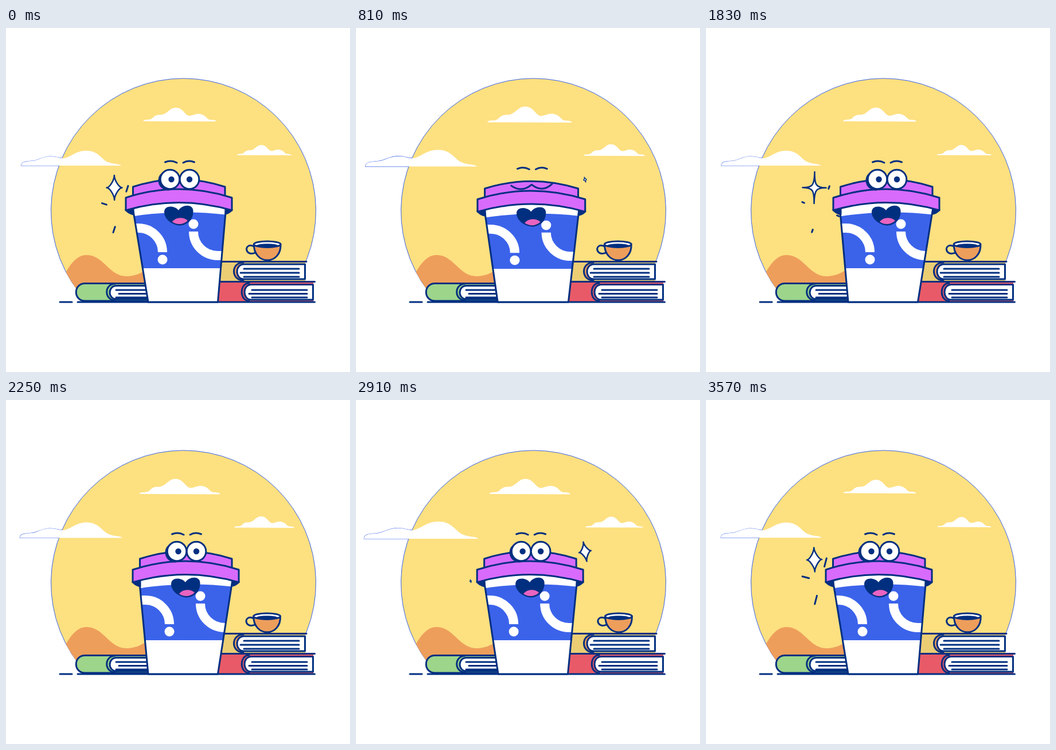
These frames come from a looping animation (600x600 px, 3600 ms). An HTML page:

```html
<!DOCTYPE html>
<html lang="en">
<head>
<meta charset="utf-8">
<title>Coffee and books</title>
<style>
html, body { margin: 0; width: 100%; height: 100%; overflow: hidden; background: #fff; }
svg { display: block; width: 100vw; height: 100vh; }
.ink { stroke: #012f80; stroke-width: 3; stroke-linecap: round; stroke-linejoin: round; }
.line { fill: none; }
.flat { stroke: none; }
.thin { stroke: #3b63ea; stroke-width: 1; }
.navy { fill: #012f80; }
.white { fill: #fff; }
.blue { fill: #3b63ea; }
.purple { fill: #d86bfc; }
.orange { fill: #ee9e5b; }
</style>
</head>
<body>
<svg viewBox="0 0 600 600">
  <defs>
    <clipPath id="sun"><path d="M142 478A231 231 0 1 1 477 478Z"/></clipPath>
    <clipPath id="bodyClip"><path class="bodyShape"/></clipPath>
    <path id="cloud" d="M-63 10.5C-58 7 -53 11 -47 6C-41 -1 -36 1 -30 0C-21 -2 -17 -12 -7 -12C7 -12 9 3 18 2C25 1 28 -2 35 -1C47 1 46 9 54 9C59 9 63 10 63 12L-63 11.5Z"/>
    <path id="longCloud" d="M-87 13C-87 6 -79 6 -69 5C-59 5 -51 -3 -36 -3C-24 -3 -19 1 -12 0C1 -3 8 -13 26 -13C48 -13 53 4 64 7C73 11 81 9 87 13Z"/>
  </defs>

  <use class="left thin white" href="#longCloud"/>
  <path class="thin" fill="#fde080" d="M142 478A231 231 0 1 1 477 478Z"/>
  <path class="orange" clip-path="url(#sun)" d="M95 445C115 400 130 396 141 396C170 396 180 433 210 433C232 433 245 421 260 412V478H95Z"/>
  <use class="left white" href="#longCloud"/>
  <use id="topCloud" class="white" href="#cloud"/>
  <use id="rightCloud" class="white" href="#cloud"/>

  <g class="ink">
    <path fill="#9dd58b" d="M255 445.5H138C117 445.5 117 476 138 476H255"/>
    <path class="line" d="M190 446C171 447 171 474 190 475"/>
    <path class="white" d="M255 449.500H193C177 449.500 177 473 193 473H255M192 457H250M197 463.500H250M192 470H250"/>

    <path class="flat" fill="#e95a68" d="M360 443H536V478H360Z"/>
    <path class="line" d="M424 445C407 445 407 476 424 476"/>
    <path class="white" d="M535.500 447.500H428C412 447.500 412 474 428 474H535.500Z"/>
    <path class="line" d="M429 457H525M424 463.500H525M429 470H525"/>

    <path class="flat" fill="#ebcd74" d="M365 408H522V441H365Z"/>
    <path class="orange" d="M414 409C392 409 392 440 414 440"/>
    <path class="white" d="M521.500 412H415C399 412 399 438 415 438H521.500Z"/>
    <path class="line" d="M415 420H511M409 427H511M415 434H511"/>

    <path class="line" d="M366 407.500H524M366 442.500H538.500M94 478H115M125 478H538.500"/>

    <g id="mug">
      <path class="line" d="M433 381C423 376 417 383 421 390C425 395 432 394 436 391"/>
      <path class="orange" d="M432.500 377C432 394 443 405 456 405C469 405 480 394 479 377Z"/>
      <ellipse class="white" cx="455.700" cy="377.200" rx="23.300" ry="5.200"/>
      <ellipse class="navy flat" cx="455.700" cy="379.800" rx="19" ry="3.500"/>
    </g>
  </g>

  <g id="sparkles" class="ink"></g>

  <g id="cup">
    <path class="bodyShape white"/>
    <g clip-path="url(#bodyClip)"><g class="lean">
      <path class="blue" d="M190 334Q301 311 415 330V419H190Z"/>
      <path fill="none" stroke="#fff" stroke-width="16" d="M205 349H231A42 42 0 0 1 273 391M327 355A42 42 0 0 0 369 397H405"/>
      <circle class="white" cx="273" cy="404" r="8.500"/>
      <circle class="white" cx="327" cy="342" r="8.500"/>
    </g></g>
    <path class="bodyShape ink line"/>
    <g class="lean ink">
      <path class="navy" d="M209 317Q213 323 222 325V310ZM394 317Q391 322 383 324V310Z"/>
      <path class="purple" d="M221.500 294V277Q301 251 382 277V294Z"/>
      <path class="purple" d="M209 296Q301 266 394 296V318Q301 291 209 318Z"/>
      <path class="navy flat" d="M276 321C276 309 294 309 301 318C307 308 326 306 326.500 319C327 336 314 344 303 344.500C289 343.500 276 333 276 321Z"/>
      <path class="flat" fill="#e864c0" d="M290 338C297 329 311 330 317 336C309 343.500 298 344 290 338Z"/>
      <g id="eyes">
        <circle class="navy" cx="283" cy="266" r="16"/>
        <circle class="white" cx="286" cy="264" r="16.800"/>
        <circle class="white" cx="320" cy="264" r="16.800"/>
        <circle class="navy flat" cx="288.500" cy="264" r="5.200"/>
        <circle class="navy flat" cx="320" cy="264" r="5.200"/>
      </g>
      <path id="lids" class="line" d="M267 272Q285 285 302 270Q320 285 337 269"/>
      <path id="brows" class="line" d="M277.500 234Q288 229.500 298 235M309 235Q318 229.500 328.500 234"/>
    </g>
  </g>
</svg>
<script>
const LOOP = 3600, CYCLE = 1800;
const all = s => document.querySelectorAll(s);
const el = id => document.getElementById(id);
const set = (nodes, name, value) => nodes.forEach(n => n.setAttribute(name, value));
const clamp = x => Math.min(1, Math.max(0, x));
const mix = (a, b, k) => a + (b - a) * clamp(k);
const ease = x => (x = clamp(x)) < .5 ? 4 * x ** 3 : 1 - 4 * (1 - x) ** 3;
const wave = (t, peak) => Math.cos(2 * Math.PI * (t - peak) / CYCLE);
const place = (x, y, sx, sy = sx) => `translate(${x} ${y}) scale(${sx} ${sy})`;

// x, y and birth time of each sparkle
const stars = [[189, 278.5, 1285], [200, 316, 1080], [399.5, 264.5, 760]];

function star(age) {
  if (age > 640) return '';
  const grow = mix(0, 1, age / 200), swell = clamp((age - 350) / 130);
  const pop = clamp((age - 515) / 15), fade = 1 - clamp((age - 555) / 85);
  const w = mix(mix(10.5, 13, swell), 20.5, pop) * grow * fade;
  const h = mix(mix(17, 21, swell), 27.5, pop) * grow * fade;
  const bulge = mix(.65, .15, pop);
  const turn = mix(-16, 1, (age - 250) / 290);
  const p = w * bulge, q = h * bulge;
  return `<path class="white" stroke-width="${mix(1, 2.5, age / 150)}" transform="rotate(${turn})"
    d="M0 ${-h}C0 ${-q} ${p} 0 ${w} 0C${p} 0 0 ${q} 0 ${h}C0 ${q} ${-p} 0 ${-w} 0C${-p} 0 0 ${-q} 0 ${-h}Z"/>`;
}

function burst(age) {
  const u = (age - 560) / 200;
  if (u < .2 || u > 1) return '';
  const outer = 43 * (1 - (1 - u) ** 3), inner = Math.min(outer, 40 * u);
  const a = inner * .8, b = outer * .8;
  return `<path class="line" transform="rotate(${22 * u})"
    d="M0 ${-inner}V${-outer}M0 ${inner}V${outer}M${-a} 0H${-b}M${a} 0H${b}"/>`;
}

function draw(t) {
  const dx = 13 * (ease((t - 40) / 1760) - ease((t - 1800) / 1700));
  const blink = ease((210 - Math.abs(t % CYCLE - 810)) / 150);
  const squash = .015 * blink;

  set(all('.left'), 'transform', place(114, 227, (186.5 + 13.5 * wave(t, 1065)) / 174));
  set([el('topCloud')], 'transform', place(303, 151, (136.5 + 10.5 * wave(t, 780)) / 126));
  set([el('rightCloud')], 'transform', place(450.5, 213, (100 + 7 * wave(t, 690)) / 126));
  set([el('mug')], 'transform', `translate(${.75 + 1.6 * wave(t, 1200)} 0)`);

  el('sparkles').innerHTML = stars.map(([x, y, start]) => {
    const age = (t - start + LOOP) % CYCLE;
    return `<g transform="translate(${x} ${y})">${star(age)}${burst(age)}</g>`;
  }).join('');

  set([el('cup')], 'transform', place(308, 478, 1 + squash, 1 - squash) + ' translate(-308 -478)');
  set(all('.bodyShape'), 'd', `M${219.5 + dx} 304L248 478H369.5L${384.5 + dx} 304`);
  set(all('.lean'), 'transform', `translate(${dx} 0)`);
  set([el('eyes')], 'transform', place(0, 278 * blink, 1, 1 - blink));
  set([el('eyes')], 'opacity', blink < .9 ? 1 : 0);
  set([el('lids')], 'opacity', blink < .9 ? 0 : 1);
  set([el('brows')], 'transform', `translate(0 ${8 * blink})`);
}

const begin = performance.now();
function tick() {
  draw((performance.now() - begin) % LOOP);
  requestAnimationFrame(tick);
}
tick();
</script>
</body>
</html>
```
